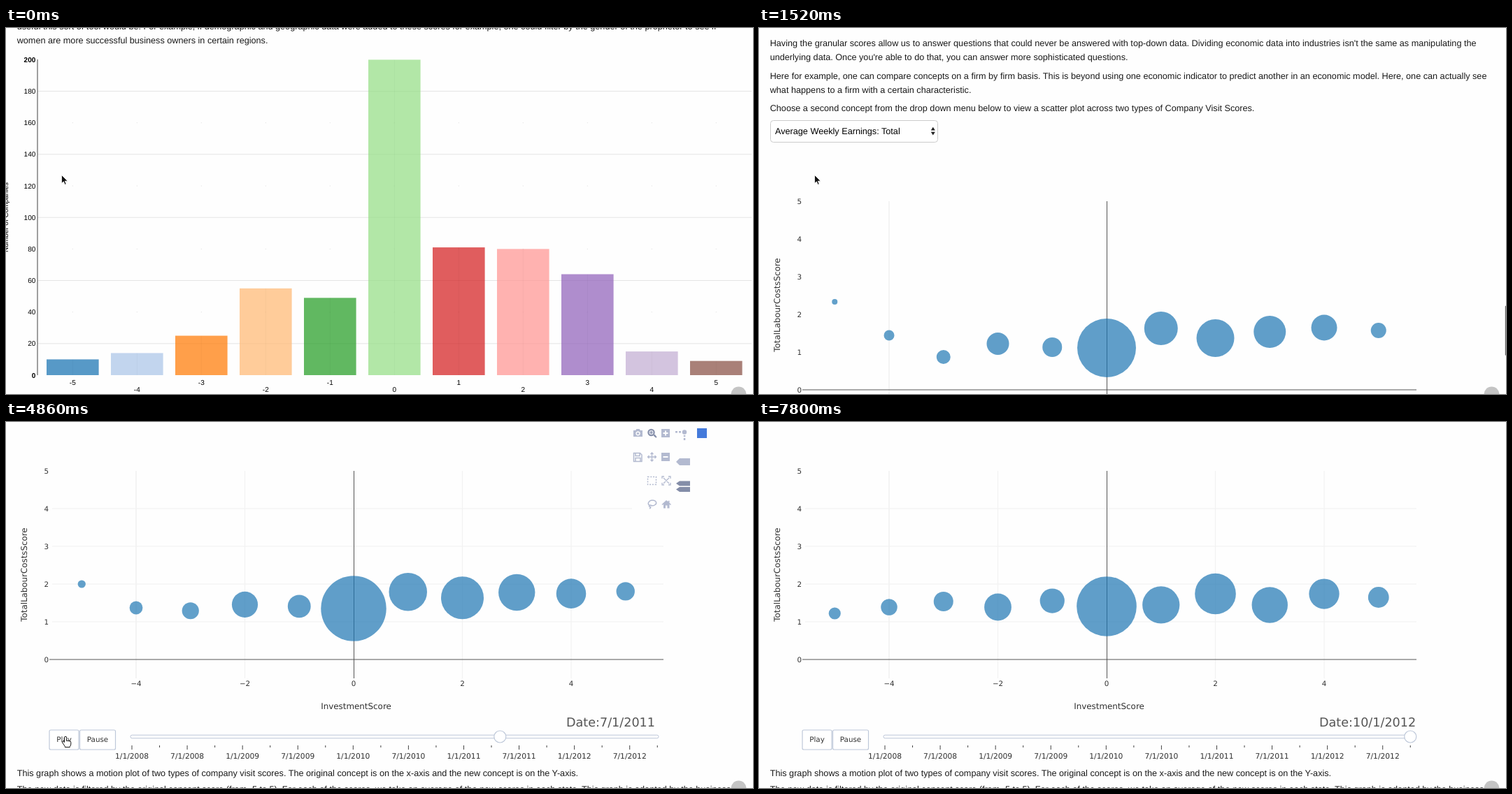
Write an HTML page that moves like this. It is 1068 px wide and 524 px high and loops after 8680 ms.

```html
<!DOCTYPE html>
<html lang="en">
<head>
<meta charset="utf-8">
<title>Company scores</title>
<style>
html, body { margin: 0; width: 100%; height: 100%; overflow: hidden; background: #fefefe; }
svg { display: block; width: 1068px; height: 524px; text-rendering: geometricPrecision; }
.copy { font: 12.67px "Liberation Sans", Arial, sans-serif; fill: #1a1a1a; }
.bars { font: 10px "Liberation Sans", Arial, sans-serif; fill: #000; }
.plot { font: 10.3px "DejaVu Sans", Verdana, sans-serif; fill: #303030; }
.mid { text-anchor: middle; }
.end { text-anchor: end; }
</style>
</head>
<body>
<svg viewBox="0 0 1068 524">
  <g id="page"></g>
  <rect id="thumb" x="1066.8" width="3" height="71" rx="1" fill="#666"/>
  <circle cx="1047.5" cy="524.5" r="11" fill="#c4c4c4"/>
  <g id="pointer">
    <path id="arrow" d="M0 0v12l2.8-2.6 1.9 4.4 2-.9-1.9-4.2h3.9z" fill="#111" stroke="#fff" stroke-width=".8"/>
    <path id="cross" d="M-5.5 1h11M0-4.5v11" stroke="#111" stroke-width="1.2"/>
    <path id="hand" d="M-1.5 1.2q0-2 1.6-2t1.6 2v4.5q1-1 2.3 0 1.2-.6 2 .3 1.8-.3 1.8 1.6v2.5q0 2-1.5 3.5v1h-7v-1.2L-4.4 8q-.8-2 .8-2l2 1.5z" fill="#fff" stroke="#111"/>
  </g>
</svg>
<script>
const LOOP = 8680;
const PLOT_TOP = 706;          // page offset of the scatter section
const $ = id => document.getElementById(id);
const range = (n, fn) => Array.from({ length: n }, (_, i) => fn(i)).join('');
const text = (x, y, s, attrs = '') => `<text x="${x}" y="${y}" ${attrs}>${s}</text>`;
const line = (x1, y1, x2, y2, color, width = 1) =>
  `<path d="M${x1} ${y1}L${x2} ${y2}" stroke="${color}" stroke-width="${width}"/>`;
const rect = (x, y, w, h, attrs) => `<rect x="${x}" y="${y}" width="${w}" height="${h}" ${attrs}/>`;

function paragraph(y, ...lines) {
  return lines.map((s, i) => text(15.7, y + i * 20.2, s, 'class="copy"')).join('');
}

const copy = [
  paragraph(1.5,
    'useful this sort of tool would be! For example, if demographic and geographic data were added to these scores for example, one could filter by the gender of the proprietor to see if',
    'women are more successful business owners in certain regions.'),
  paragraph(553.5,
    "Having the granular scores allow us to answer questions that could never be answered with top-down data. Dividing economic data into industries isn't the same as manipulating the",
    "underlying data. Once you're able to do that, you can answer more sophisticated questions."),
  paragraph(600.7,
    'Here for example, one can compare concepts on a firm by firm basis. This is beyond using one economic indicator to predict another in an economic model. Here, one can actually see',
    'what happens to a firm with a certain characteristic.'),
  paragraph(647,
    'Choose a second concept from the drop down menu below to view a scatter plot across two types of Company Visit Scores.'),
  paragraph(1212.5,
    'This graph shows a motion plot of two types of company visit scores. The original concept is on the x-axis and the new concept is on the Y-axis.'),
  paragraph(1236,
    'The new data is filtered by the original concept score (from -5 to 5). For each of the scores, we take an average of the new scores in each state. This graph is adapted by the business.'),
].join('');

function barChart() {
  const counts = [10, 14, 25, 55, 49, 200, 81, 80, 64, 15, 9];
  const colors = ['#1f77b4', '#aec7e8', '#ff7f0e', '#ffbb78', '#2ca02c', '#98df8a',
    '#d62728', '#ff9896', '#9467bd', '#c5b0d5', '#8c564b'];
  const yOf = v => 497 - v * 2.258;
  const center = i => 95.3 + i * 92;
  const grid = range(11, k => {
    const v = k * 20, y = yOf(v), edge = v % 200 === 0;
    const rule = k % 2 ? line(45, y, 1066, y, '#e4e4e4')
      : edge ? '' : range(11, i => rect(center(i) - .5, y - .5, 1, 1, 'fill="#ddd"'));
    return rule + text(42.3, y + 3.6, v, `class="end" ${edge ? 'font-weight="bold"' : ''}`);
  });
  const bars = counts.map((v, i) => {
    const x = center(i), y = yOf(v);
    return rect(x - 37.3, y, 74.6, 497 - y, `fill="${colors[i]}" fill-opacity=".75"`) +
      line(x, y, x, 497, 'rgba(0,0,0,.03)') +
      text(x, i % 2 ? 521 : 511, i - 5, 'class="mid"');
  }).join('');
  return `<g class="bars">${grid}${bars}${line(45, 45, 45, 497, '#888', 1.6)}` +
    `<text class="mid" transform="translate(3 271) rotate(-90)">Number of Companies</text></g>`;
}

function dropDown() {
  return rect(16.5, 660.5, 239, 31, 'rx="4" fill="#fff" stroke="#ccc"') +
    text(23, 680, 'Average Weekly Earnings: Total', 'class="copy" style="fill:#000"') +
    '<path d="M245.8 674.6l3-4.8 3 4.8zm0 2.2l3 4.8 3-4.8z" fill="#222"/>';
}

function toolbar() {
  const tag = (y, h) => `<path d="M958 ${y}l5-${h / 2}h15v${h}h-15z"/>`;
  const square = (y, sign) =>
    `<path d="M937 ${y - 6}h12v12h-12z"/><path d="${sign}" stroke="#fefefe" stroke-width="2"/>`;
  return `<g id="tools">${rect(895, 6, 112, 121, 'fill="#fefefe"')}
    <g fill="#b3bad0">
      <path fill-rule="evenodd" d="M897 12h3l1.5-2h4l1.5 2h3v9h-13zM903.5 13.2a3.2 3.2 0 1 0 .1 0z"/>
      <circle cx="903.5" cy="16.4" r="1.7"/>
      ${square(16, 'M939.5 16h7M943 12.5v7')}${square(50, 'M939.5 50h7')}
      <circle cx="970" cy="14.5" r="3.2"/>
      <path d="M957 13h3v2.5h-3zM962 13h3v2.5h-3zM968.8 19h2.5v2h-2.5zM968.8 23h2.5v3h-2.5z"/>
      ${tag(57, 10)}
      <path d="M944 112l-6.5 6 1 1 1.5-1.2v5.7h3v-4h2.5v4h3v-5.7l1.5 1.2 1-1-2.5-2.3v-3h-1.800v1.3z"/>
    </g>
    <g fill="none" stroke="#b3bad0" stroke-width="1.5">
      <path d="M897.5 44.5h9l2.5 2.5v9.5h-11.5zM900 44.5v4h6v-4M900 56v-4.5h7v4.5"/>
      <path d="M917.5 50h12M923.5 44v12M921.5 46l2-2 2 2M921.5 54l2 2 2-2M919.5 48l-2 2 2 2M927.5 48l2 2-2 2" stroke-width="1.3"/>
      <path d="M917.5 78.5h12v11h-12z" stroke-dasharray="2 1.8"/>
      <path d="M938 81v-3h3M947 78h3v3M950 87v3h-3M941 90h-3v-3M940 80l8 8M948 80l-8 8" stroke-width="1.3"/>
      <path d="M920 119.5c-4-3 0-7.5 4-7.5 6 0 7 4.5 4 6.5-2 1.5-5 1.5-7 .5-2 0-2 3 .5 2.5.5 1-.5 2-1.5 2.5"/>
    </g>
    <g fill="#848da8">
      <path d="M925.5 19.5l2-2 3 4-1.2 1.2z"/>
      ${tag(88, 7)}${tag(96.5, 7)}
    </g>
    <circle cx="922.5" cy="15" r="4.2" fill="#d8dce6" stroke="#848da8" stroke-width="2"/>
    <path d="M920.5 15h4M922.5 13v4" stroke="#848da8"/>
    ${rect(988, 9, 14, 14, 'fill="#447adb"')}
  </g>`;
}

const xOf = v => 497 + v * 77.75;
const slideX = q => 180 + q * 39.54;
const dateOf = q => `${1 + 3 * (q % 4)}/1/${2008 + Math.floor(q / 4)}`;

function scatter() {
  const evens = [-4, -2, 0, 2, 4];
  const grid = range(4, k => line(66, 286 - 54 * k, 940, 286 - 54 * k, '#f2f2f2', 1.2)) +
    [-2, 2, 4].map(v => line(xOf(v), 70, xOf(v), 367, '#f2f2f2', 1.2)).join('');
  const labels = range(6, v => text(61, 343.7 - 54 * v, v, 'class="end"')) +
    evens.map(v => text(xOf(v), 377.8, String(v).replace('-', '−'), 'class="mid"')).join('');
  const button = (x, w, s) => rect(x, 441, w, 28, 'rx="2" fill="#fff" stroke="#bec8d9" stroke-width="1.2"') +
    text(x + w / 2, 457.8, s, 'class="mid"');
  const ticks = range(20, q => line(slideX(q), 463, slideX(q), q % 2 ? 466 : 469, '#444') +
    (q % 2 ? '' : text(slideX(q), 482.3, dateOf(q), 'class="mid" font-size="10.7"')));
  return `<g class="plot" transform="translate(0 ${PLOT_TOP})">
    ${line(xOf(-4), 70, xOf(-4), 367, '#ededed', 1.2)}<g id="grid">${grid}</g>
    ${line(62, 340, 940, 340, '#555')}${line(497.5, 70, 497.5, 367, '#555')}
    <g fill="#1f77b4" fill-opacity=".7">${range(11, i => `<circle class="bubble" cx="${xOf(i - 5)}"/>`)}</g>
    ${labels}
    ${text(500.5, 410.5, 'InvestmentScore', 'class="mid" font-size="11.9"')}
    <text class="mid" font-size="11.85" transform="translate(30 218.5) rotate(-90)">TotalLabourCostsScore</text>
    ${text(801, 435.5, '', 'id="date" font-size="17.6" fill="#555"')}
    ${button(62, 42, 'Play')}${button(105.5, 51, 'Pause')}
    ${rect(178, 448.2, 755, 4.6, 'rx="2.3" fill="#fcfcfe" stroke="#bec8d9"')}
    ${ticks}
    <circle id="knob" cy="450.5" r="8.5" fill="#fff" stroke="#bec8d9" stroke-width="1.2"/>
    ${toolbar()}</g>`;
}

$('page').innerHTML = copy + barChart() + dropDown() + scatter();
const bubbles = [...document.querySelectorAll('.bubble')];

const clamp = u => Math.max(0, Math.min(1, u));
const mix = (a, b, u) => a + (b - a) * u;
const cubic = u => u < .5 ? 4 * u ** 3 : 1 - 4 * (1 - u) ** 3;

// Smooth change of size `by` between two moments
function glide(t, from, to, by) {
  const u = clamp((t - from) / (to - from));
  return by * u * u * (3 - 2 * u);
}

// Playback runs quarter by quarter, each step easing into place
const FIRST = 11, LAST = 19, START = 3732, PERIOD = 532;
function playhead(t, duration) {
  const i = Math.min(LAST - FIRST - 1, Math.floor((t - START) / PERIOD));
  return i < 0 ? FIRST : FIRST + i + cubic(clamp((t - START - i * PERIOD) / duration));
}

// Bubble sizes at the start; heights above the axis at the start, turn and end of playback
const sizes = [4, 7.5, 10, 16, 14, 42, 24, 27, 23, 18.5, 11];
const startH = [126, 78, 47, 66, 61, 60, 88, 74, 83, 89, 85];
const turnH = [63, 48, 80, 75, 76, 70, 88, 87, 93, 81, 94];
const endH = [66, 75, 83, 75, 84, 76, 78, 94, 78, 94, 89];
const TURN = .6;

function bubbleAt(i, u) {
  const r = sizes[i];
  const height = u < TURN
    ? mix(startH[i], turnH[i], u / TURN) + 9 * Math.sin(Math.PI * u / TURN)
    : mix(turnH[i], endH[i], (u - TURN) / (1 - TURN));
  return { height, radius: mix(r, 5 + .9 * r, u) + .15 * r * Math.sin(Math.PI * u) };
}

const show = (id, on) => $(id).setAttribute('visibility', on ? 'visible' : 'hidden');

function draw(t) {
  const scroll = glide(t, 400, 1319, 528) + glide(t, 1480, 2300, 136) + glide(t, 2600, 3000, 42);
  $('page').setAttribute('transform', `translate(0 ${-scroll})`);
  $('thumb').setAttribute('y', 324.9 + scroll * .138);
  show('thumb', scroll > 0 && t < 4560);
  show('grid', t > 2650);
  $('tools').setAttribute('opacity', glide(t, 1650, 1950, 1) - glide(t, 6750, 7120, 1));

  const u = (playhead(t, 300) - FIRST) / (LAST - FIRST);
  bubbles.forEach((b, i) => {
    const { height, radius } = bubbleAt(i, u);
    b.setAttribute('cy', 340 - height);
    b.setAttribute('r', radius);
  });
  const slide = playhead(t, 150);
  $('knob').setAttribute('cx', slideX(slide));
  $('date').textContent = 'Date:' + dateOf(Math.ceil(slide));

  const x = 79.5 + glide(t, 3000, 3820, 5.5) + glide(t, 6210, 6500, 12);
  const y = 210.5 + glide(t, 3000, 3820, 240.5) + glide(t, 6210, 6500, 33);
  const plotY = y + scroll - PLOT_TOP;
  const shape = plotY > 441 && plotY < 469 ? 'hand' : plotY > 70 && plotY < 367 ? 'cross' : 'arrow';
  $('pointer').setAttribute('transform', `translate(${x} ${y})`);
  for (const id of ['arrow', 'cross', 'hand']) show(id, id === shape && t < 6500);
}

// The picture is refreshed at a low, steady rate
const STEP = 150, PHASE = 60;
function loop() {
  const now = performance.now() % LOOP;
  draw(Math.floor((now - PHASE) / STEP) * STEP + PHASE);
  requestAnimationFrame(loop);
}
loop();
</script>
</body>
</html>
```
